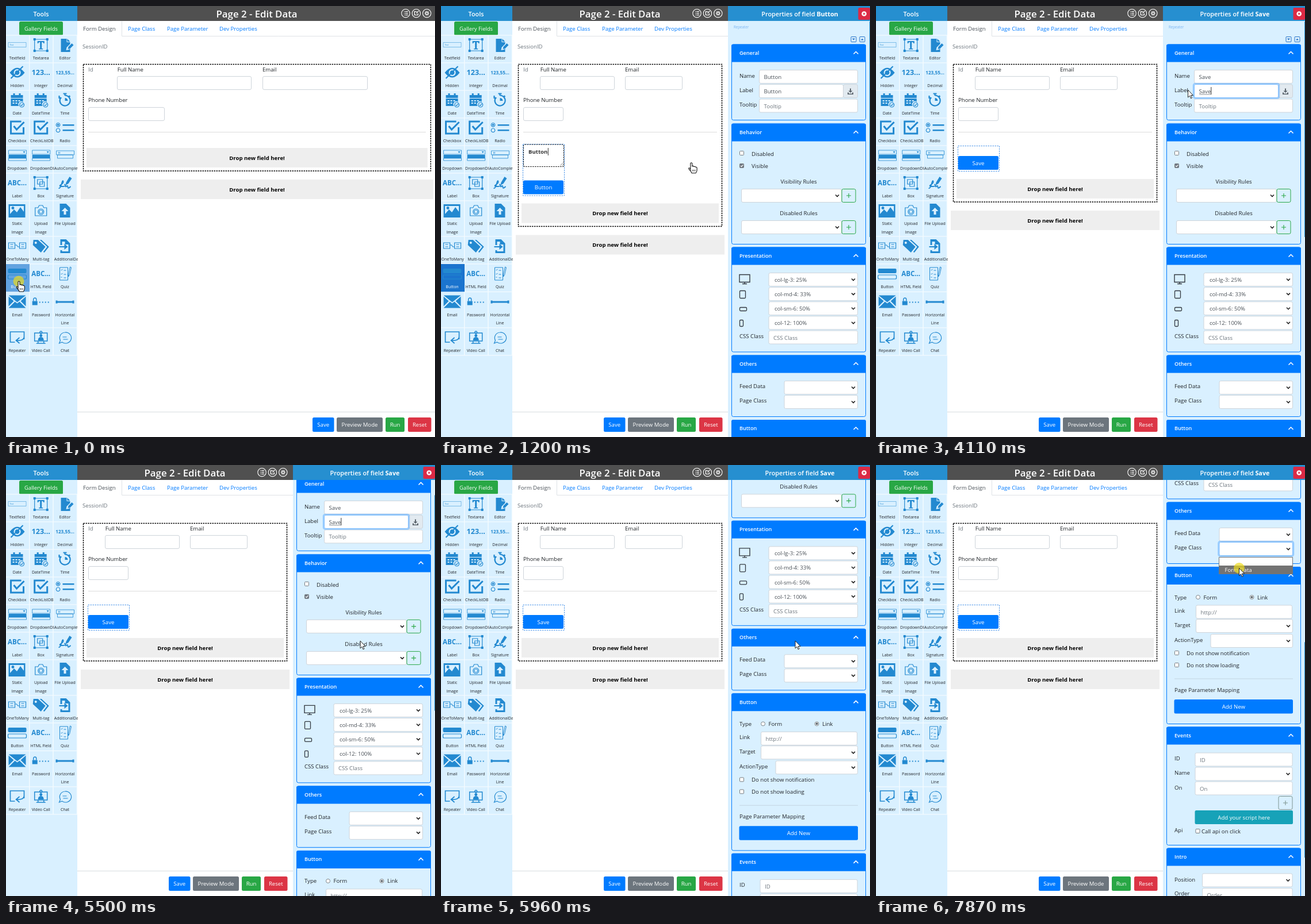
Animation of 746x750 px, one loop 8000 ms. Source, as an HTML page with a canvas:

```html
<!DOCTYPE html>
<html lang="en">
<head>
<meta charset="utf-8">
<title>Form designer</title>
<style>
  html, body { margin: 0; width: 100%; height: 100%; overflow: hidden; background: #fff; }
  canvas { display: block; }
</style>
</head>
<body>
<canvas id="stage" width="746" height="750"></canvas>
<script>
const ctx = document.getElementById('stage').getContext('2d');
const LOOP = 8000;
const BLUE = '#007bff', HEAD = '#268fd0', PALE = '#d9f0ff', ICON = '#2389d0';
const INK = '#212529', GRAY = '#6c757d', BORDER = '#ced4da', GREEN = '#28a745';

// ---------- drawing helpers ----------
function setFont(size = 9.6, weight = 400) {
  ctx.font = `${weight} ${size}px "Open Sans", "Noto Sans", sans-serif`;
}
function widthOf(s, size, weight) {
  setFont(size, weight);
  return ctx.measureText(s).width;
}
function text(s, x, y, color = INK, size = 9.6, weight = 400, align = 'left') {
  setFont(size, weight);
  ctx.textAlign = align;
  ctx.fillStyle = color;
  ctx.fillText(s, x, y);
}
const center = (s, x, y, color, size, weight) => text(s, x, y, color, size, weight, 'center');

function rect(x, y, w, h, fill, stroke, radius = 0, lineWidth = 1, dash = []) {
  ctx.beginPath();
  ctx.roundRect(x, y, w, h, radius);
  if (fill) { ctx.fillStyle = fill; ctx.fill(); }
  if (stroke) {
    ctx.setLineDash(dash);
    ctx.strokeStyle = stroke;
    ctx.lineWidth = lineWidth;
    ctx.stroke();
    ctx.setLineDash([]);
  }
}
function disc(x, y, r, fill, stroke, lineWidth = 1) {
  rect(x - r, y - r, 2 * r, 2 * r, fill, stroke, r, lineWidth);
}
function shape(x, y, d, fill, stroke, lineWidth = 1) {
  ctx.save();
  ctx.translate(x, y);
  const path = new Path2D(d);
  if (fill) { ctx.fillStyle = fill; ctx.fill(path, 'evenodd'); }
  if (stroke) { ctx.strokeStyle = stroke; ctx.lineWidth = lineWidth; ctx.stroke(path); }
  ctx.restore();
}
function button(s, x, y, w, h, fill) {
  rect(x, y, w, h, fill, null, 2.5);
  center(s, x + w / 2, y + h / 2 + 3.8, '#fff');
}
function input(x, y, w, value = '', color = '#495057', focused = false, pad = 8.5) {
  if (focused) rect(x - 1, y - 1, w + 2, 25.5, null, 'rgba(0,123,255,.3)', 3, 2.5);
  rect(x + .5, y + .5, w - 1, 23, '#fff', focused ? '#80bdff' : BORDER, 2.5);
  text(value, x + pad, y + 16, color);
}
function select(x, y, w, value, focused) {
  input(x, y, w, value, '#495057', focused, 10.5);
  shape(x + w - 8, y + 12, 'M-3-1.5l3 3 3-3', null, '#222', 1.6);
}
function plus(x, y, color) {
  rect(x + .5, y + .5, 24, 23, null, color, 2.5);
  shape(x + 12.5, y + 12, 'M-4 0h8M0-4v8', null, color, 1.1);
}
function checkbox(x, y, checked) {
  rect(x + .5, y + .5, 7, 7, checked ? '#6f7882' : '#fff', '#767b80', 1);
  if (checked) shape(x + 4, y + 4, 'M-2 0l1.5 1.7 3-3.4', null, '#fff', 1.2);
}
function radio(x, y, on) {
  disc(x, y, 3.5, '#fff', '#6f767c', .9);
  if (on) disc(x, y, 2, '#5d656c');
}

// Linear interpolation through [time, value...] keys
function track(keys, t) {
  const i = keys.findIndex(k => k[0] > t);
  if (i < 0) return keys[keys.length - 1].slice(1);
  if (i === 0) return keys[0].slice(1);
  const a = keys[i - 1], b = keys[i], p = (t - a[0]) / (b[0] - a[0]);
  return a.slice(1).map((v, n) => v + (b[n + 1] - v) * p);
}

// ---------- tool palette ----------
const corners = 'M-13-12h4v4h-4zM9-12h4v4h-4zM-13 8h4v4h-4zM9 8h4v4h-4z';
const calendar = {
  fill: 'M-11-9h21v5h-21zM-7-12h3v3h-3zM3-12h3v3h-3zM-11-3h21v6a5 5 0 0 0-7 7h-14zm3 3v2h3v-2zm5 0v2h3v-2zm5 0v2h3v-2zm-10 4v2h3v-2zm5 0v2h3v-2z',
  line: 'M8 4a4 4 0 1 0 .1 0zM6 8l1.5 1.5 3-3',
};
const check = { line: 'M11-1v11h-22v-21h18M-6-3l5 6L12-10', width: 3 };
const dropdown = { fill: 'M-15-1h31v6h-31zM10-7h4l-2 3z', line: 'M-15-9h31v7h-31zM-15 5h31v4h-31z', width: .8 };
const tools = [
  ['Textfield', { line: 'M-15.5-4.5h31v8h-31z', width: .5, caption: 'Text', size: 3.5 }],
  ['Textarea', { fill: corners + 'M-6-7h12v4h-1.5l-1-2h-2v11h2v1.5h-7v-1.5h2v-11h-2l-1 2h-1.5z', line: 'M-11-10h22v20h-22z' }],
  ['Editor', { fill: 'M-7-11h10v6h6v3l-6 6-1 5 5-1 2-2v6h-16zM4-11l5 5h-5zM6 3l6-6 3 3-6 6-4 1z' }],
  ['Hidden', { fill: 'M-13 0q13-17 26 0q-13 17-26 0zm13-6a6 6 0 1 0 .1 0zm0 2a4 4 0 1 1-.1 0z', line: 'M-11 10L10-11', width: 2.2 }],
  ['Integer', { caption: '123...', size: 12.6 }],
  ['Decimal', { caption: '123,55...', size: 8.1 }],
  ['Date', calendar],
  ['DateTime', calendar],
  ['Time', { fill: 'M0-4a5 5 0 0 1 5 5h-5z', line: 'M-7-5a9 9 0 1 0 7-3.5M-10-8v4h4M-3-11.5h6M0-11v3M7-8l2 2', width: 2.2 }],
  ['Checkbox', check],
  ['CheckListDB', check],
  ['Radio', { fill: 'M-12-7a1.8 1.8 0 1 0 .1 0zM-4-6h20v2.5h-20zM-4 3h20v2.5h-20z', line: 'M-12-8.5a3.3 3.3 0 1 0 .1 0zM-12 1a3.3 3.3 0 1 0 .1 0z' }],
  ['Dropdown', dropdown],
  ['DropdownDB', dropdown],
  ['AutoComplete', { line: 'M-15-8h31v7h-31zM-13-1h27v6h-27zM-11-6v3M-9-6v3', width: .8 }],
  ['Label', { caption: 'ABC...', size: 11.5 }],
  ['Box', { fill: corners, line: 'M-11-10h22v20h-22zM-6-6h9v8h-9zM-2-2h8v8h-8z' }],
  ['Signature', { fill: 'M2-1l6-10 4 3-6 9-5 3z', line: 'M-11 9q3 1 5-7t3-5-4 6 3 3 3-4M1 7q4-4 4 0t5-1', width: 1.8 }],
  ['Static|Image', { fill: 'M-15-11h29v23h-29zm2.5 3v14l7-8 5 5 6-9 6 8v-10zm5 1a2.5 2.5 0 1 1-.1 0z' }],
  ['Upload|Image', { line: 'M-10-5h5l2-4h6l2 4h5v14h-20zM0-3a5 5 0 1 0 .1 0zM0-1a3 3 0 1 0 .1 0z' }],
  ['File Upload', { fill: 'M-9-12h11l7 7v17h-18zM0-5l-6 6h4v6h4v-6h4z' }],
  ['OneToMany', { line: 'M-15-6h11v10h-11zM4-6h11v10h-11zM-4-2h3l2 3h3M-12-3h5M-12 1h5M7-3h5M7 1h5' }],
  ['Multi-tag', { fill: 'M-13-11h8l13 12-8 10-14-13zm4 3a2 2 0 1 0 .1 0zM-2-11h3l13 12-8 10-2-1 7-9z' }],
  ['AdditionalData', { fill: 'M-8-12h10l7 7v17h-17v-5h3v2h11v-12h-6v-5h-5v6h-3zM-10 0h9v-4l6 5-6 5v-4h-9z' }],
  ['Button', { fill: 'M-14-9h28q2 0 2 2v4q0 2-2 2h-28q-2 0-2-2v-4q0-2 2-2z', line: 'M-14 2h28q2 0 2 2v3q0 2-2 2h-28q-2 0-2-2v-3q0-2 2-2z' }],
  ['HTML Field', { caption: 'ABC...', size: 11.5 }],
  ['Quiz', { line: 'M-9-11h14v22h-14zM-7-7l1 1 2-2M-2-6h4M-7 0l1 1 2-2M-2 1h4M-7 6h2M-2 7h4M9-12l-3 13v4l2-3 3-13z', width: 1 }],
  ['Email', { fill: 'M-15-11h30l-15 12zM-15-9l9 8-9 9zM15-9l-9 8 9 9zM-15 11l11-11 4 3 4-3 11 11z' }],
  ['Password', { fill: 'M-15-1h9v7h-9zM-3 0h2v2h-2zm5 0h2v2h-2zm5 0h2v2h-2zm5 0h2v2h-2z', line: 'M-13-1v-3a2.5 2.5 0 0 1 5 0v3', width: 1.5 }],
  ['Horizontal|Line', { fill: 'M-16-2h3v1h26v-1h3v5h-3v-1h-26v1h-3z' }],
  ['Repeater', { line: 'M-4 8h-8v-18h24v13M12-2q0 8-13 7M4 0l-6 5 6 5', width: 1.7 }],
  ['Video Call', { fill: 'M0-6a2.5 2.5 0 1 0 .1 0zM-5 5q0-6 5-6t5 6z', line: 'M-11-8h22v14h-22zM-5 6v4h10v-4M-8 10h16M0-11a2 2 0 1 0 .1 0z', width: 1.5 }],
  ['Chat', { line: 'M0-9a10 9.5 0 1 1-5 17l-5 2 2-5a9.5 9.5 0 0 1 8-14zM-4-1h7M-3 3h8' }],
];
const rowTops = [52, 100, 148, 196, 244, 292, 340, 402, 450, 498.5, 561, 609];
const BUTTON_TOOL = 24;

function drawTool(index, pressed = 0) {
  const [label, icon] = tools[index];
  const row = Math.floor(index / 3), col = index % 3, top = rowTops[row];
  const left = col * 41.6, cx = [19.5, 60.7, 102.5][col], height = rowTops[row + 1] - top;
  ctx.save();
  ctx.beginPath();
  ctx.rect(left, top - 1, 41.6, height);
  ctx.clip();
  rect(left, top - 1, 41, height, `rgba(27,116,206,${pressed})`);
  if (icon.fill) shape(cx, top + 16, icon.fill, ICON);
  if (icon.line) shape(cx, top + 16, icon.line, null, ICON, icon.width || 1.2);
  if (icon.caption) {
    const x = icon.line ? cx - 9.5 : cx;
    center(icon.caption, x, top + 16 + icon.size / 3, ICON, icon.size, icon.line ? 400 : 700);
  }
  label.split('|').forEach((line, n) => {
    const x = Math.max(left + .5, cx - widthOf(line, 7) / 2);
    text(line, x, top + 41 + n * 14.7, pressed > .5 ? '#fff' : INK, 7);
  });
  ctx.restore();
}

function drawPalette(t) {
  rect(0, 0, 124, 750, PALE);
  rect(0, 0, 124, 26, HEAD);
  center('Tools', 61, 18, '#fff', 10.8, 600);
  rect(23, 27, 76, 24, GREEN, null, 2.5);
  center('Gallery Fields', 61, 43, '#fff', 9.4);
  for (const y of rowTops) rect(0, y - 1.8, 124, 1.4, '#f4fbff');
  for (const x of [40, 81.3, 122.8]) rect(x, 51, 1.4, 557, '#f4fbff');
  const [pressed] = track([[0, .62], [70, .62], [300, 1], [1250, 1], [1860, 0]], t);
  tools.forEach((_, i) => drawTool(i, i === BUTTON_TOOL ? pressed : 0));
}

// ---------- form designer ----------
function dropZone(x, y, right) {
  rect(x, y, right - x, 34, '#eee');
  center('Drop new field here!', (x + right) / 2, y + 20.5, '#000', 9.6, 700);
}

function drawDesigner(t, s) {
  const right = s.open ? 496 : 746, edge = s.open ? 499 : 746;
  rect(124, 0, edge - 124, 26, '#505050');
  center('Page 2 - Edit Data', (124 + right) / 2 + 1, 20, '#fff', 16.8, 600);
  ['M-3-3h1M-1-3h5M-3 0h1M-1 0h5M-3 3h1M-1 3h5', 'M1-3h-4v6h6v-3M0 0l4-4', 'M0-2a2 2 0 1 0 .1 0zM0-4v2M0 2v2M-4 0h2M2 0h2M-3-3l1 1M3 3l-1-1M3-3l-1 1M-3 3l1-1']
    .forEach((d, i) => {
      const x = right - 51 + i * 18.4;
      disc(x, 12.7, 7.2, null, '#fff', 1.1);
      shape(x, 12.7, d, null, '#fff', 1.3);
    });

  shape(0, 0, `M201.5 26.5V52.5H${edge}`, null, '#dee2e6');
  text('Form Design', 134, 43, '#495057');
  text('Page Class', 212, 43, BLUE);
  text('Page Parameter', 280, 43, BLUE);
  text('Dev Properties', 371, 43, BLUE);
  text('SessionID', 133, 74, GRAY);

  const z = s.zoneY;
  rect(134.5, 101.5, right - 142, z - 61.5, null, '#000', 0, 1.5, [2.5, 1.5]);
  const [nameX, nameW, mailX, mailW, phoneW] = s.open ? [172, 130, 320, 100, 70] : [193, 234, 446, 183, 133];
  text('Id', 143, 113.5, GRAY);
  text('Full Name', nameX + .8, 113.5);
  text('Email', mailX, 113.5);
  text('Phone Number', 143, 167);
  input(nameX, 122, nameW);
  input(mailX, 122, mailW);
  input(143, 176, phoneW);
  rect(143, 219, right - 159, 1, '#dcdcdc');

  if (s.open) {
    const editor = s.editorHeight, top = 243 - 3 * editor / 42.5;
    rect(142.5, top + .5, 72, z - 14 - top, null, '#4a94e8', 0, 1, [2.5, 1.5]);
    if (editor > 1) {
      ctx.save();
      ctx.beginPath();
      ctx.rect(142, 240, 73, editor - 1);
      ctx.clip();
      rect(143.5, 241, 70, 38.5, '#fff', '#111', 2, 1.1, [2.5, 1.5]);
      text('Button', 152, 257, '#333', 9.6, 700);
      if (t < 1600) rect(152.5 + widthOf('Button', 9.6, 700), 247, 1, 13, '#333');
      shape(212, 278, 'M-5 0l5-5M-2 0l2-2', null, '#777', .8);
      ctx.restore();
    }
    button(s.label, 143, z - 40, 70, 24, BLUE);
  }
  dropZone(140, z, right - 13);
  dropZone(130, z + 55, right - 3);

  rect(124, 706, edge - 124, 1, '#d8dce0');
  button('Save', right - 213, 716, 37.5, 25, BLUE);
  button('Preview Mode', right - 171, 716, 80, 25, GRAY);
  button('Run', right - 86, 716, 33, 25, GREEN);
  button('Reset', right - 47, 716, 40.5, 25, '#dc3545');
}

// ---------- properties ----------
function panel(title, top, bottom) {
  rect(505.5, top + .5, 233, bottom - top, PALE, BLUE, 3);
  rect(505, top, 234, 31, BLUE, null, [3, 3, 0, 0]);
  text(title, 519, top + 18.3, '#fff', 9.1, 600);
  shape(721.5, top + 15, 'M-4 2l4-4 4 4', null, '#fff', 1.5);
}

function drawLabelField(t, s) {
  const focused = t >= 1830;
  input(553, 136, 147, s.label, '#495057', focused);
  const end = 562 + s.labelWidth;
  if (s.selected) {
    const start = Math.max(561, Math.min(end, s.cursor[0]));
    ctx.save();
    ctx.beginPath();
    ctx.rect(start, 140.5, end - start, 14.5);
    ctx.clip();
    rect(start, 140.5, end - start, 14.5, '#2f7fd6');
    text(s.label, 561.5, 152, '#fff');
    ctx.restore();
  } else if (focused) {
    if (t >= 3580) rect(562, 153.5, s.labelWidth, .8, '#687078');
    const caretOn = t < 4110 || Math.floor((t - 4110) / 530) % 2 === 0;
    if (caretOn) rect(end - .5, 141, 1, 13, '#333');
  }
}

function drawPanels(t, s) {
  text('Repeater', 509, 39, '#79b4f2', 6.2);
  for (const [x, d] of [[717.5, 'M-2.5-1.5h5l-2.5 3z'], [732.5, 'M-2.5 1.5h5l-2.5-3z']]) {
    rect(x - 4.5, 53.5, 9, 9, null, '#2873c8', 1);
    shape(x, 58, d, '#2873c8');
  }

  panel('General', 66.5, 198);
  text('Name', 519, 125);
  text('Label', 519, 150);
  text('Tooltip', 519, 175);
  input(553, 111, 172, s.label);
  input(553, 161.5, 172, 'Tooltip', GRAY);
  rect(699.5, 136.5, 25, 23, '#e2eaf0', BORDER, 2.5);
  shape(712, 148.5, 'M-1-5h2v4h2.5l-3.5 3.5-3.5-3.5h2.5zM-5 2h2v2h6v-2h2v3.5h-10z', '#5c656d');
  drawLabelField(t, s);

  panel('Behavior', 204.5, 414);
  checkbox(519, 252);
  text('Disabled', 540, 261);
  checkbox(519, 274, true);
  text('Visible', 540, 282);
  [['Visibility Rules', 309], ['Disabled Rules', 364]].forEach(([name, y]) => {
    center(name, 622, y);
    select(522, y + 9, 175);
    plus(696.5, y + 9, GREEN);
  });

  panel('Presentation', 419.5, 601.5);
  shape(528, 475, 'M-9-7.5h18v13h-18zM-4 8.5h8M0 5.5v3', null, '#343a40', 1.4);
  rect(519.5, 495.5, 10, 13, null, '#343a40', 1.5, 1.3);
  rect(519.5, 524.5, 12, 6, null, '#343a40', 1.5, 1.3);
  rect(519.5, 546.5, 6, 11, null, '#343a40', 1.5, 1.3);
  ['col-lg-3: 25%', 'col-md-4: 33%', 'col-sm-6: 50%', 'col-12: 100%']
    .forEach((v, i) => select(569.5, 464 + i * 25.1, 155.5, v));
  text('CSS Class', 519, 577.5);
  input(569.5, 564.5, 155.5, 'CSS Class', GRAY);

  panel('Others', 607.5, 714);
  text('Feed Data', 519, 665);
  select(596.5, 652, 128.5);
  text('Page Class', 519, 690);
  select(596.5, 677, 128.5, '', t >= 7150);

  panel('Button', 720, 993);
  text('Type', 519, 776.5);
  radio(560, 773);
  text('Form', 569.5, 776.5);
  radio(653.5, 773, true);
  text('Link', 663, 776.5);
  text('Link', 519, 800);
  input(556, 786.5, 168, 'http://', GRAY);
  text('Target', 519, 825);
  select(556, 811, 169);
  text('ActionType', 519, 851);
  select(581.5, 837, 143.5);
  checkbox(519, 866);
  text('Do not show notification', 540, 874);
  checkbox(519, 887);
  text('Do not show loading', 540, 895);
  rect(519, 914.5, 206, 1, '#c3d5e2');
  text('Page Parameter Mapping', 519, 937.5);
  button('Add New', 518.5, 951, 206.5, 24.5, BLUE);

  panel('Events', 998.5, 1204);
  text('ID', 519, 1057);
  input(554.5, 1043.5, 170, 'ID', GRAY);
  text('Name', 519, 1082);
  select(554.5, 1068.5, 170);
  text('On', 519, 1107.5);
  input(554.5, 1093.5, 170, 'On', GRAY);
  plus(699.5, 1119, '#7d9490');
  button('Add your script here', 554.5, 1144, 170.5, 24, '#17a2b8');
  text('Api', 519, 1182);
  checkbox(555.5, 1176);
  text('Call api on click', 566, 1184);

  panel('Intro', 1209.5, 1400);
  text('Position', 519, 1268);
  select(567, 1253.5, 157.5);
  text('Order', 519, 1292);
  input(567, 1279, 157.5, 'Order', GRAY);
}

function drawProperties(t, s) {
  rect(499, 0, 247, 750, PALE);
  ctx.save();
  ctx.beginPath();
  ctx.rect(499, 26, 247, 724);
  ctx.clip();
  ctx.translate(0, -s.scroll);
  drawPanels(t, s);
  ctx.restore();
  rect(745, 27 + s.scroll * .518, 1, 375, HEAD);

  rect(499, 0, 247, 26, HEAD);
  const lead = 'Properties of field ';
  const leadWidth = widthOf(lead, 10.8, 600);
  const x = 624 - (leadWidth + widthOf(s.label, 10.8, 700)) / 2;
  text(lead, x, 18, '#fff', 10.8, 600);
  text(s.label, x + leadWidth, 18, '#fff', 10.8, 700);
  rect(725.5, 3, 20.5, 21, '#dc2a45', null, 2);
  disc(735.7, 13.5, 4.3, '#fff');
  shape(735.7, 13.5, 'M-1.5-1.5l3 3M-1.5 1.5l3-3', null, '#dc2a45', 1.1);

  if (t >= 7150) {
    const hover = s.cursor[1] > 168 ? 1 : 0;
    rect(596.5, 160.5, 128, 29, '#fff', '#767676');
    rect(597, 161 + hover * 14, 127, 14, '#737373');
    text('Form Data', 606.5, 185.5, hover ? '#fff' : INK);
  }
}

// ---------- pointer ----------
const pointerPath = [
  [70, 22, 479], [870, 434.5, 273], [1200, 434.5, 273], [1800, 608, 148], [2330, 611.5, 149],
  [2590, 542.5, 146], [4840, 542.5, 146], [5380, 616, 306], [6220, 616, 306], [6350, 623, 281],
  [6490, 632, 230], [6550, 633, 225], [7010, 634.5, 156], [7300, 634.5, 156], [7670, 631.5, 179.5],
];
const presses = [[0, 870], [2390, 2790], [7010, 7280], [7870, 8000]];

function drawPointer(t, [x, y]) {
  if (t >= 70 && t < 1070) {
    ctx.save();
    ctx.globalAlpha = .55;
    ctx.translate(x - 22, y - 479);
    drawTool(BUTTON_TOOL, .7);
    ctx.restore();
  }
  if (presses.some(([from, to]) => t >= from && t < to)) disc(x, y, 9.5, 'rgba(236,218,30,.7)');
  if (t < 1350) {
    shape(x + .5, y, 'M-1.5 1q1.5-2 3 0v5q2-1 3 .8 2-1 3 .7 2-.4 2.3 1.5v4q0 2-2 5h-7q-1-3-5-7-1-2 .5-2t2.2 2.5z', '#fff', '#111', 1.1);
    shape(x + .5, y, 'M2 12v3M4.3 12v3M6.6 12v3', null, '#111', .8);
  } else if (t > 1700 && t < 2560) {
    shape(x, y, 'M-2.5-7h2l.5.5.5-.5h2M0-6.5v13M-2.5 7h2l.5-.5.5.5h2', null, '#222', 1);
  } else {
    shape(x, y, 'M0 0v13l3-2.8 2 4.6 2-.9-2-4.4h4z', '#fff', '#111', .9);
  }
}

function labelAt(t) {
  const typed = [3580, 3780, 3980, 4110].filter(time => t >= time).length;
  return typed ? 'Save'.slice(0, typed) : 'Button';
}

function draw(t) {
  const open = t >= 1070;
  const [closing] = track([[1830, 0], [2160, 1]], t);
  const editorHeight = 42.5 * (.5 + .5 * Math.cos(Math.PI * closing));
  const label = labelAt(t);
  const state = {
    open, editorHeight, label,
    zoneY: open ? 301 + editorHeight : 247,
    labelWidth: widthOf(label),
    selected: t >= 2390 && t < 3580,
    scroll: track([[5415, 0], [5500, 48.5], [5960, 322], [6310, 543]], t)[0],
    cursor: track(pointerPath, t),
  };
  rect(0, 0, 746, 750, '#fff');
  drawDesigner(t, state);
  drawPalette(t);
  if (open) drawProperties(t, state);
  drawPointer(t, state.cursor);
}

const start = performance.now();
function frame() {
  draw((performance.now() - start) % LOOP);
  requestAnimationFrame(frame);
}
frame();
</script>
</body>
</html>
```
